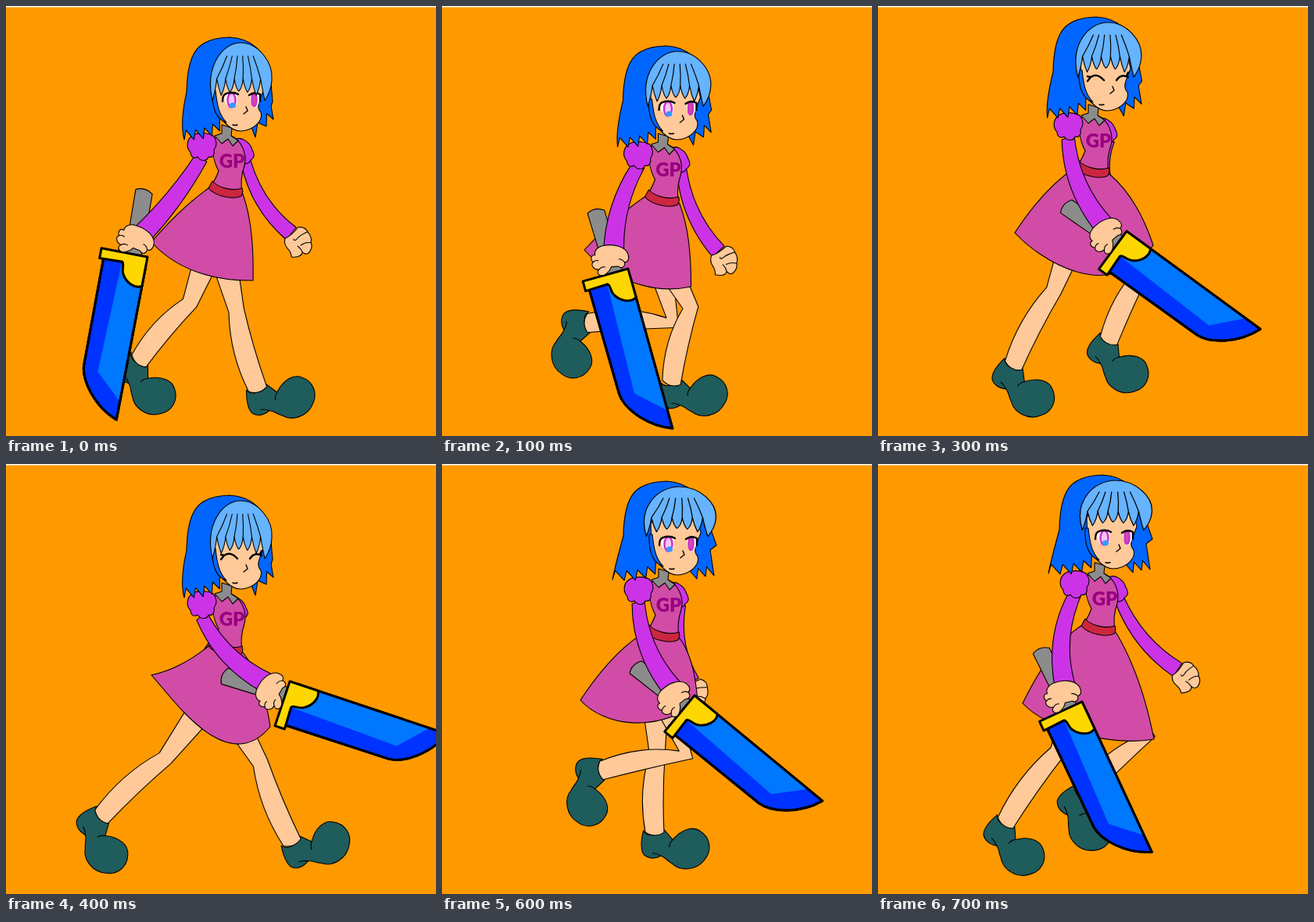
Write an HTML page that moves like this. It is 550 by 550 pixels and loops after 0.8 s.

```html
<!DOCTYPE html>
<html lang="en">
<head>
<meta charset="utf-8">
<title>Walk cycle</title>
<style>
html, body { margin: 0; width: 100%; height: 100%; overflow: hidden; background: #f90; }
svg { display: block; width: 100vw; height: 100vh; }
.skin { fill: #ffc999; }
.sleeve { fill: #cc33e6; }
.dress { fill: #d14ca6; }
.shoe { fill: #1f5c5c; }
.grey { fill: #8c8c8c; }
.line { fill: none; }
text { font: 900 24px Lato, "Open Sans", sans-serif; fill: #990080; stroke: none; text-anchor: middle; }
</style>
</head>
<body>
<svg viewBox="0 0 550 550">
  <defs>
    <g id="shoe">
      <path class="shoe" d="M-14 4C-8 9 4 6 10-8L25-1C30-20 42-28 52-26C68-24 76-10 73 3C70 23 50 31 38 27C28 26 26 23 20 24C14 32 6 34 0 32C-8 28-12 14-14 4Z"/>
      <path class="line" d="M25-1Q23 4 25 9M20 24Q14 23 9 25"/>
    </g>
  </defs>
  <rect width="550" height="550" fill="#f90"/>
  <rect width="550" height="1.5" fill="#fff"/>
  <g stroke="#000" stroke-width="1.1" stroke-linejoin="round" stroke-linecap="round">
    <use id="shoeF" href="#shoe"/><path id="legF" class="skin"/>
    <use id="shoeN" href="#shoe"/><path id="legN" class="skin"/>
    <path id="armF" class="sleeve"/>
    <g id="fist">
      <path class="skin" d="M-16-5Q-8-8 1-19Q10-20 13-13Q19-6 17 1Q20 7 14 14Q10 17 6 13Q5 20-8 19Q-9 12-13 8Q-18 2-16-5Z"/>
      <path class="line" d="M13-13Q4-9 1-6Q-4 0-5-4M17 1Q10 0 4 4M6 13Q4 8 0 5"/>
    </g>
    <path id="puffF" class="sleeve" d="M-13-14C-4-21 8-12 11-2C15 5 13 9 9 11C6 18-2 16-6 14Z"/>
    <path id="skirt" class="dress"/>
    <g id="body">
      <path class="dress" d="M268 168C262 182 265 198 272 211Q268 222 262 230L302 238Q299 222 305 204C309 188 300 172 290 167Z"/>
      <path fill="#cc2640" d="M264 224C272 233 290 237 302 233Q304 238 301 243C292 248 268 244 259 233Z"/>
      <path class="grey" d="M276 152L289 156L288 166L297 172L290 179L284 170L276 176L267 166L276 163Z"/>
      <text x="289" y="207">GP</text>
    </g>
    <g id="sword">
      <path class="grey" d="M2 8L-80 9Q-88 20-82 31L2 29Z"/>
      <g stroke-width="3">
        <path fill="#03f" d="M12 0H212C200 32 170 53 151 54L12 55Z"/>
        <path fill="#07f" stroke="none" d="M12 1.5H187L156 35L12 31Z"/>
        <path class="line" d="M12 0H212C200 32 170 53 151 54L12 55Z"/>
        <path fill="#ffd700" d="M0 0H38C43 8 38 20 28 26C22 30 13 27 12 31L13 60H0Z"/>
      </g>
    </g>
    <path id="armN" class="sleeve"/>
    <g id="hand">
      <path class="skin" d="M-37 24C-36 8-28-4-18-5C-11-5-8-2-9 2C-3 3-2 8-6 11L-8 20C-2 24 1 32-1 36C-4 41-8 38-9 36C-10 43-18 45-20 41C-26 44-30 40-28 36C-34 36-37 30-37 24Z"/>
      <path class="line" d="M-9 36Q-12 32-10 28M-20 41Q-22 37-20 34M-9 2Q-14 4-15 8"/>
    </g>
    <path id="puffN" class="sleeve" d="M-13-14C-21-8-20 3-15 7C-15 13-10 16-6 13C-2 19 6 19 8 13C14 15 16 9 15 4C20-2 18-10 14-14C8-18-6-19-13-14Z"/>
    <g id="head">
      <path id="hair" fill="#06f"/>
      <path class="skin" d="M266 95L267 124C270 144 288 160 300 160C318 159 329 146 326 136C319 129 325 120 330 106L322 70H278Z"/>
      <path fill="#06f" d="M264 108C263 128 268 145 282 149C273 140 270 128 268 108Z"/>
      <path class="line" stroke-width="1.4" d="M307 129L309 134L304 138M290 152Q293 153 296 152"/>
      <g id="open">
        <path fill="#fff" stroke="none" d="M279 117Q283 109 295 112Q298 126 291 131Q281 130 279 117ZM312 116Q317 109 325 114Q325 126 319 130Q312 126 312 116Z"/>
        <g stroke="#cc33cc" stroke-width="2.500">
          <ellipse cx="288.500" cy="120.500" rx="5" ry="9" fill="#f4c6f4"/>
          <ellipse cx="317.500" cy="119.500" rx="3" ry="8.500" fill="#d14ca6"/>
        </g>
        <ellipse cx="290" cy="127" rx="4" ry="3.500" fill="#39f" stroke="none"/>
        <path class="line" stroke-width="2.400" d="M277 122Q277 113 282 112Q290 109 297 113M311 114Q318 109 325 113L325 122"/>
      </g>
      <path id="shut" class="line" stroke-width="2.400" d="M275 122L279 117Q287 111 296 121M312 121Q318 112 327 117M279 117L275 116M325 115L327 111"/>
      <g id="fringe">
        <path id="locks" fill="#66b3ff"/>
        <path id="strands" class="line"/>
      </g>
    </g>
  </g>
</svg>
<script>
// Key poses. sway: lean, hair flare. sword: guard corner, angle. near, far: ankles.
// hem: left corner, right corner, sag.
const contactA = { sway: [0, 0], sword: [181, 321, 100.8], fist: [373, 302],
  near: [322, 490], far: [170, 454], hem: [186, 302, 316, 351, 1] };
const passA = { sway: [1, .7], sword: [295, 309, 48.1], fist: [347, 308],
  near: [265, 473], far: [202, 357], hem: [178, 280, 321, 325, 22] };
const highA = { sway: [-7, .4], sword: [318, 288, 36.2], fist: [300, 262],
  near: [173, 460], far: [295, 428], hem: [175, 290, 352, 306, 79] };
const contactB = { sway: [0, 0], sword: [363, 278, 18.5], fist: [240, 288],
  near: [122, 451], far: [366, 484], hem: [186, 270, 338, 336, 66] };
const passB = { sway: [1, 1], sword: [323, 296, 39.5], fist: [322, 292],
  near: [204, 392], far: [272, 471], hem: [177, 302, 327, 305, 40] };
const highB = { sway: [1, 1], sword: [261, 304, 65.1], fist: [393, 273],
  near: [260, 423], far: [163, 459], hem: [185, 306, 353, 352, 10] };

const BOB = [0, 11, -18, -26];   // contact, down, passing, high
const DIP = 21;                  // how far the down pose sinks below the blend

function down(a, b) {
  const pose = {};
  for (const key in a) pose[key] = a[key].map((v, i) => (v + b[key][i]) / 2);
  pose.sword[1] += DIP;
  pose.fist[1] += DIP;
  pose.hem[1] += DIP;
  pose.hem[3] += DIP;
  return pose;
}

const poses = [contactA, down(contactA, passA), passA, highA,
  contactB, down(contactB, passB), passB, highB];

const el = id => document.getElementById(id);
const set = (id, name, value) => el(id).setAttribute(name, value);
const place = (id, [x, y], turn = 0) => set(id, "transform", `translate(${x} ${y}) rotate(${turn})`);
const add = (p, d, k = 1) => [p[0] + d[0] * k, p[1] + d[1] * k];
const mid = (a, b) => [(a[0] + b[0]) / 2, (a[1] + b[1]) / 2];
const dist = (a, b) => Math.hypot(b[0] - a[0], b[1] - a[1]);

// Unit normal of a limb segment, on the side she walks towards.
function normal(a, b) {
  const d = dist(a, b) || 1;
  return [(b[1] - a[1]) / d, (a[0] - b[0]) / d];
}

function spin([x, y], degrees) {
  const a = degrees * Math.PI / 180, c = Math.cos(a), s = Math.sin(a);
  return [x * c - y * s, x * s + y * c];
}

function drawArm(id, shoulder, wrist, bend, size) {
  const n = normal(shoulder, wrist);
  const elbow = add(mid(shoulder, wrist), n, bend);
  const end = normal(elbow, wrist);
  set(id, "d", `M${add(shoulder, n, -8.5 * size)}Q${add(elbow, n, -11 * size)} ${add(wrist, end, -13 * size)}
    L${add(wrist, end, 13 * size)}Q${add(elbow, n, 11 * size)} ${add(shoulder, n, 8.5 * size)}Z`);
}

// The knee bends more the closer the foot is to the hip; a lifted or trailing foot points down.
function drawLeg(side, hip, ankle) {
  const reach = dist(hip, ankle);
  const bend = Math.max(reach - 210, Math.min(85, 1.9 * (203 - reach)));
  const knee = add(mid(hip, ankle), normal(hip, ankle), bend);
  const thigh = normal(hip, knee), shin = normal(knee, ankle);
  const cap = normal([0, 0], add(thigh, shin)).map((v, i) => i ? v : v);
  const front = [-cap[1], cap[0]];
  const calf = mid(knee, ankle);
  const sole = add(ankle, [-shin[1], shin[0]], 8);
  set("leg" + side, "d", `M${add(hip, thigh, -20)}L${add(knee, front, -10)}
    Q${add(calf, shin, -23)} ${add(ankle, shin, -12)}Q${sole} ${add(ankle, shin, 12)}
    Q${add(calf, shin, 8)} ${add(knee, front, 10)}L${add(hip, thigh, 20)}Z`);
  const lift = Math.max(0, 465 - ankle[1]);
  place("shoe" + side, ankle, 27 - .27 * (ankle[0] - 265) + Math.min(68, 1.1 * lift));
}

function drawSkirt(waist, [lx, ly, rx, ry, sag]) {
  const back = add(waist, [259, 233]), front = add(waist, [303, 241]);
  const left = add(mid(back, [lx, ly]), [0, -.6], ly - back[1] - 55);
  const right = add(mid(front, [rx, ry]), [8, -15]);
  set("skirt", "d", `M${back}Q${left} ${lx} ${ly}C${lx + 30} ${ly + 33} ${rx - 55} ${ry + sag} ${rx} ${ry}
    Q${right} ${front}Z`);
}

// Zigzag through hair tips with a notch above each gap.
const spikes = tips => tips.map((t, i) =>
  (i ? "L" + add(mid(tips[i - 1], t), [-4, -12]) : "") + "L" + t).join("");

function drawHair(flare) {
  const endX = 228 - 11 * flare;
  const back = [];
  for (let i = 0; i <= 5; i++) {
    const t = i / 5;
    back.push([281 - (281 - endX) * t ** 1.2, 171 - 22 * (1 - t) ** 3 - 5 * flare * t]);
  }
  const front = [[342 + 5 * flare, 145 + 16 * flare], [333 + 3 * flare, 154 + 8 * flare], [319 + 6 * flare, 168 - 3 * flare]];
  set("hair", "d", `M${back[5]}Q${222 - flare * 2} 150 231 110C232 60 244 41 286 40
    Q328 42 338 88L${341 + 9 * flare} 122L${339 + 3 * flare} 128
    ${spikes(front)}L312 150L300 120L272 120${spikes(back)}Z`);
  set("fringe", "transform", `translate(${262 - 4 * flare} 47) scale(${1 + .17 * flare} ${1 - .14 * flare})`);
}

function buildFringe() {
  let locks = "M2 74C-8 30 15 0 38 0C60 0 80 24 78 48Q77 62 69 74", strands = "";
  for (let i = 6; i > 0; i--) {
    const gap = 11.2 * i - 3.600, tip = 11.2 * i - 9.200;
    const tipY = 62 + 12 * ((i - 4) / 3) ** 2;
    locks += `Q${gap + 2} 58 ${gap} 46Q${gap - 1} 58 ${tip} ${tipY}`;
    strands += `M${gap} 46Q${gap * .8 + 9} 32 ${gap * .6 + 16} 17`;
  }
  set("locks", "d", locks + "Z");
  set("strands", "d", strands);
}

function draw(step) {
  const { sway: [lean, flare], sword, fist, near, far, hem } = poses[step];
  const body = [lean, BOB[step % 4]];
  place("body", body);
  place("head", body);
  drawHair(flare);
  drawSkirt(body, hem);

  const hip = add(body, [270, 288]);
  drawLeg("N", hip, near);
  drawLeg("F", hip, far);

  const puffN = add(body, [251, 180]);
  const wristN = add(sword, spin([-29, 11], sword[2]));
  const shoulderN = add(puffN, [-1, 14]);
  const behind = Math.min(0, wristN[0] - shoulderN[0] + 20);
  drawArm("armN", shoulderN, wristN, -20 - behind / 2, 1);
  place("puffN", puffN);
  place("sword", sword, sword[2]);
  place("hand", sword, sword[2]);

  const puffF = add(body, [302 + .06 * (fist[0] - 340), 186]);
  const aim = Math.atan2(fist[1] - puffF[1], fist[0] - puffF[0]) * 180 / Math.PI;
  const turn = 1.2 * (aim - 60);
  drawArm("armF", add(puffF, [3, 14]), add(fist, spin([-8, -11], turn)), -18, .78);
  place("puffF", puffF);
  place("fist", fist, turn);

  const blink = step === 3 || step === 4;
  set("open", "visibility", blink ? "hidden" : "visible");
  set("shut", "visibility", blink ? "visible" : "hidden");
}

buildFringe();
const start = performance.now();
let shown = -1;
function tick() {
  const step = Math.floor((performance.now() - start) / 100) % poses.length;
  if (step !== shown) draw(shown = step);
  requestAnimationFrame(tick);
}
tick();
</script>
</body>
</html>
```
